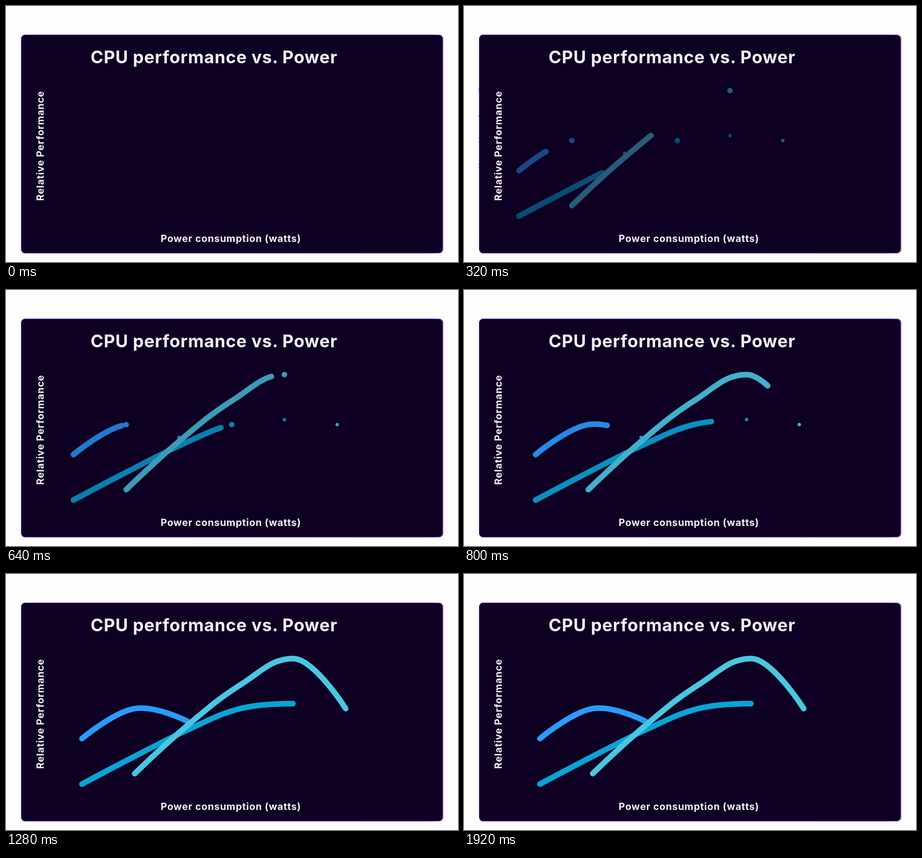
Recreate the animation shown at these times as an HTML page. Size 994 by 563 pixels, loop 2000 ms.

```html
<!DOCTYPE html>
<html lang="en">
<head>
<meta charset="utf-8">
<title>CPU performance vs. Power</title>
<style>
  html, body { margin: 0; width: 100%; height: 100%; overflow: hidden; background: #fefefe; }
  svg { display: block; width: 994px; height: 563px; }
  text { font-family: Inter, "Open Sans", sans-serif; }
  .card { fill: #0e0022; stroke: url(#edge); stroke-width: 2; filter: blur(.6px); }
  .caption { fill: #f8eefb; text-anchor: middle; font-size: 21.5px; font-weight: 700; letter-spacing: .8px; }
  .title { font-size: 38px; letter-spacing: .85px; }
  .ticks { fill: #555; font-size: 15px; text-anchor: end; }
  .line { fill: none; stroke-width: 12.3; stroke-linecap: round; }
</style>
</head>
<body>
<svg viewBox="0 0 994 563">
  <defs>
    <linearGradient id="edge">
      <stop offset="0" stop-color="#2b0d7c"/>
      <stop offset=".97" stop-color="#2b0d76"/>
      <stop offset="1" stop-color="#6d35a4"/>
    </linearGradient>
  </defs>
  <g id="ticks" class="ticks"></g>
  <rect class="card" x="34" y="64" width="926.5" height="479" rx="8"/>
  <text class="caption title" x="457.5" y="126">CPU performance vs. Power</text>
  <text class="caption" x="494.5" y="518.5">Power consumption (watts)</text>
  <text class="caption" transform="translate(82.5 307.5) rotate(-90)">Relative Performance</text>
  <g id="plot"></g>
</svg>
<script>
const LOOP = 2000, STEP = 80, SETTLE = 1206, SLIDE = 85;
const GAP = 116, LEFT = 167, TOP = 186, TENSION = .2;
const TIMES = [0, 320, 640, 800, 960, 1200];

// ys: heights at even steps; drawn: share of the line shown at TIMES
const series = [
  { color: "#2a9bff", start: 0, ys: [362, 296, 324], drawn: [0, .284, .49, .69, .813, 1] },
  { color: "#08a4d6", start: 0, ys: [462, 401, 343, 296, 285], drawn: [0, .41, .719, .846, .908, 1] },
  { color: "#49c7e2", start: 1, ys: [439, 333, 244, 186, 296], drawn: [0, .388, .678, .816, .893, 1] }
];

const plot = document.getElementById("plot");
const ticks = document.getElementById("ticks");

function add(parent, tag, attrs) {
  const el = document.createElementNS("http://www.w3.org/2000/svg", tag);
  for (const key in attrs) el.setAttribute(key, attrs[key]);
  return parent.appendChild(el);
}

// Smooth curve through evenly spaced points; handles stay below the top of the plot
function curve(x0, ys) {
  const last = ys.length - 1;
  const handles = ys.map((y, i) => {
    if (i === 0 || i === last) return { dx: 0, dy: 0 };
    const dy = TENSION * (ys[i + 1] - ys[i - 1]), room = y - TOP;
    return { dx: TENSION * 2 * GAP, dy: Math.max(-room, Math.min(room, dy)) };
  });
  let d = `M${x0} ${ys[0]}`;
  for (let i = 0; i < last; i++) {
    const x = x0 + i * GAP, next = x + GAP;
    const a = handles[i], b = handles[i + 1];
    d += `C${x + a.dx} ${ys[i] + a.dy} ${next - b.dx} ${ys[i + 1] - b.dy} ${next} ${ys[i + 1]}`;
  }
  return d;
}

function interpolate(values, t) {
  const i = TIMES.findIndex(time => time > t);
  if (i < 0) return 1;
  const share = (t - TIMES[i - 1]) / (TIMES[i] - TIMES[i - 1]);
  return values[i - 1] + (values[i] - values[i - 1]) * share;
}

for (const s of series) {
  const x0 = LEFT + s.start * GAP, last = s.ys.length - 1;
  const dot = (i, r) => add(plot, "circle", { cx: x0 + i * GAP, cy: s.ys[i], r, fill: s.color });
  dot(last - 1, 6.1);
  dot(last, 3.7);
  s.path = add(plot, "path", { class: "line", stroke: s.color, pathLength: 1, d: curve(x0, s.ys) });
}

for (let n = 1; n <= 5; n++) {
  add(ticks, "text", { x: 84.5, y: 467 - n * 55.2 }).textContent = n;
}

function draw(now) {
  const t = Math.floor((now % LOOP) / STEP) * STEP;
  const rest = Math.max(0, 1 - t / SETTLE) ** 2;
  for (const g of [plot, ticks]) {
    g.setAttribute("transform", `translate(${-SLIDE * rest} 0)`);
    g.setAttribute("opacity", 1 - rest);
  }
  for (const s of series) {
    s.path.setAttribute("stroke-dasharray", `${interpolate(s.drawn, t)} 2`);
  }
}

const begin = performance.now();
function tick() {
  draw(performance.now() - begin);
  requestAnimationFrame(tick);
}
tick();
</script>
</body>
</html>
```
